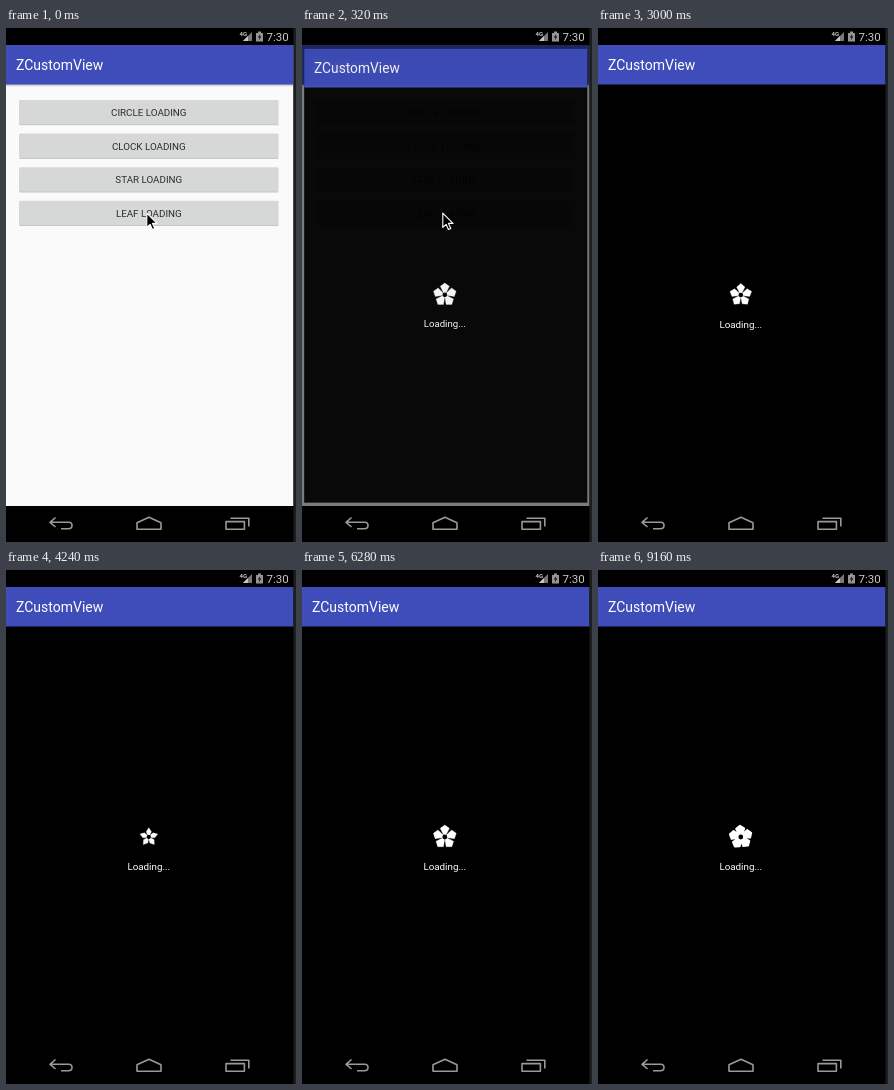
An HTML page for the animation above (9.2 s loop, 290 by 514 pixels).

```html
<!DOCTYPE html>
<html lang="en">
<head>
<meta charset="utf-8">
<title>Leaf loading</title>
<style>
  html, body { margin: 0; width: 100%; height: 100%; overflow: hidden; background: #000; }
  svg { display: block; width: 100vw; height: 100vh; }
  text { font-family: Roboto, sans-serif; }
  .title { font-size: 14px; fill: #fff; }
  .label { font-size: 9.8px; text-anchor: middle; }
  .icon { fill: none; stroke: #999; stroke-width: 1.6; stroke-linejoin: round; }
</style>
</head>
<body>
<svg viewBox="0 0 290 514">
  <defs>
    <linearGradient id="shade" x2="0" y2="1">
      <stop offset="0" stop-color="#000" stop-opacity=".28"/>
      <stop offset="1" stop-color="#000" stop-opacity="0"/>
    </linearGradient>
    <g id="bar">
      <rect y="17" width="287.5" height="39.5" fill="#3f4dba"/>
      <text class="title" x="10" y="42">ZCustomView</text>
    </g>
  </defs>
  <rect width="290" height="514"/>

  <g id="menu">
    <rect y="17" width="287.5" height="461" fill="#fafafa"/>
    <rect y="56" width="287.5" height="3" fill="url(#shade)"/>
    <use href="#bar"/>
    <g id="buttons"></g>
  </g>

  <g id="loader">
    <rect y="17" width="287.5" height="461"/>
    <use href="#bar"/>
    <path id="leaf" fill="#fff" stroke="#fff" stroke-linejoin="round"/>
    <circle id="hub" cx="142.8" cy="267"/>
    <text class="label" x="142.8" y="299.6" fill="#fff">Loading...</text>
  </g>

  <g fill="#c8c8c8">
    <text x="260.5" y="13" font-size="11.5">7:30</text>
    <text x="233.5" y="8" font-size="6" font-weight="700">4G</text>
    <path d="M246 4V13H237Z" opacity=".6"/>
    <path d="M242 8V13H237Z"/>
    <path d="M250 5H252V3.6H255V5H257V13.4H250Z" opacity=".75"/>
    <path d="M254.3 6 251.7 9.6H253.4L252.7 12.4 255.4 8.6H253.7Z" fill="#111"/>
  </g>
  <g class="icon">
    <path d="M49.5 489.5 44 494.3 49.5 499M44.5 494.3H62.5Q66 494.3 66 497.5T62.5 500.8H55"/>
    <path d="M131 501.2V494.8L143 489.3 155 494.8V501.2Z"/>
    <path d="M220 493.6H238.4V501.2H220ZM224.5 490.3H242.8V498.5"/>
  </g>
  <rect x="287.5" width="2.5" height="514" fill="#1e1e1e"/>
  <path id="cursor" d="M0 0V14.2L3.3 11.1 5.6 16.3 8 15.2 5.7 10.2H10.2Z"
        stroke="#fff" stroke-width="1.1" stroke-linejoin="round"/>
</svg>
<script>
const LOOP = 9200;
const OPEN = { start: 200, length: 300 };
const SPIN_START = 925, STATE = 1280;
const CENTER = { x: 142.8, y: 267 };
const $ = id => document.getElementById(id);
const clamp = v => Math.min(1, Math.max(0, v));

$('buttons').innerHTML = ['CIRCLE', 'CLOCK', 'STAR', 'LEAF'].map((name, i) => {
  const y = 72 + i * 33.6;
  return `<rect x="13" y="${y}" width="259.6" height="25" rx="1.5" fill="#d6d7d7"/>
    <rect x="13.5" y="${y + 24.4}" width="258.6" height=".8" fill="#bfc0c0"/>
    <text class="label" x="142.8" y="${y + 16.2}" fill="#2b2b2b">${name} LOADING</text>`;
}).join('');

// Three states in turn: spin up a full turn, shrink, grow back.
function leafPose(time) {
  const pose = { angle: 0, shrink: 0, round: 0 };
  if (time < SPIN_START) return pose;
  const t = (time - SPIN_START) / STATE % 3;
  const u = t % 1;
  if (t < 1) {
    pose.angle = 360 * u * u;
    pose.round = Math.sin(Math.PI * u);
  } else if (t < 2) {
    pose.shrink = u ** 4;
  } else {
    pose.shrink = 1 - u * u;
  }
  return pose;
}

function leafPath({ angle, shrink, round }, inset) {
  const tip = 12.2 - 4.2 * shrink - inset;
  const shoulder = 9.9 - 5.9 * shrink - inset * 0.6;
  const spread = 28 - 3 * shrink - 3 * round;
  const at = (r, deg) => {
    const a = (deg - 90) * Math.PI / 180;
    return `${(CENTER.x + r * Math.cos(a)).toFixed(2)} ${(CENTER.y + r * Math.sin(a)).toFixed(2)}`;
  };
  let d = '';
  for (let i = 0; i < 5; i++) {
    const a = angle + i * 72;
    d += `M${at(1.4, a - 36)}L${at(shoulder, a - spread)}L${at(tip, a)}` +
         `L${at(shoulder, a + spread)}L${at(1.4, a + 36)}Z`;
  }
  return d;
}

function drawLeaf(time) {
  const pose = leafPose(time);
  const width = 0.3 + 1.9 * pose.round;
  $('leaf').setAttribute('d', leafPath(pose, width / 2));
  $('leaf').setAttribute('stroke-width', width);
  $('hub').setAttribute('r', 2.4 - 0.4 * pose.shrink);
}

function drawPages(time) {
  const u = clamp((time - OPEN.start) / OPEN.length);
  const eased = 1 - (1 - u) ** 5;
  const scale = 0.8 + 0.2 * eased;
  $('menu').setAttribute('opacity', clamp(1 - u * 1.25));
  $('loader').setAttribute('opacity', eased);
  $('loader').setAttribute('transform', `translate(143.5 257) scale(${scale}) translate(-143.5 -257)`);
}

function drawCursor(time) {
  const u = clamp((time - 2320) / 280);
  const x = 140.8 + 72 * u * u, y = 185.2 - 18.5 * u * u;
  $('cursor').setAttribute('transform', `translate(${x} ${y})`);
  $('cursor').setAttribute('visibility', u < 1 ? 'visible' : 'hidden');
}

function draw(now) {
  const time = now % LOOP;
  drawPages(time);
  drawLeaf(time);
  drawCursor(time);
}

const origin = performance.now();
function tick() {
  draw(performance.now() - origin);
  requestAnimationFrame(tick);
}
tick();
</script>
</body>
</html>
```
